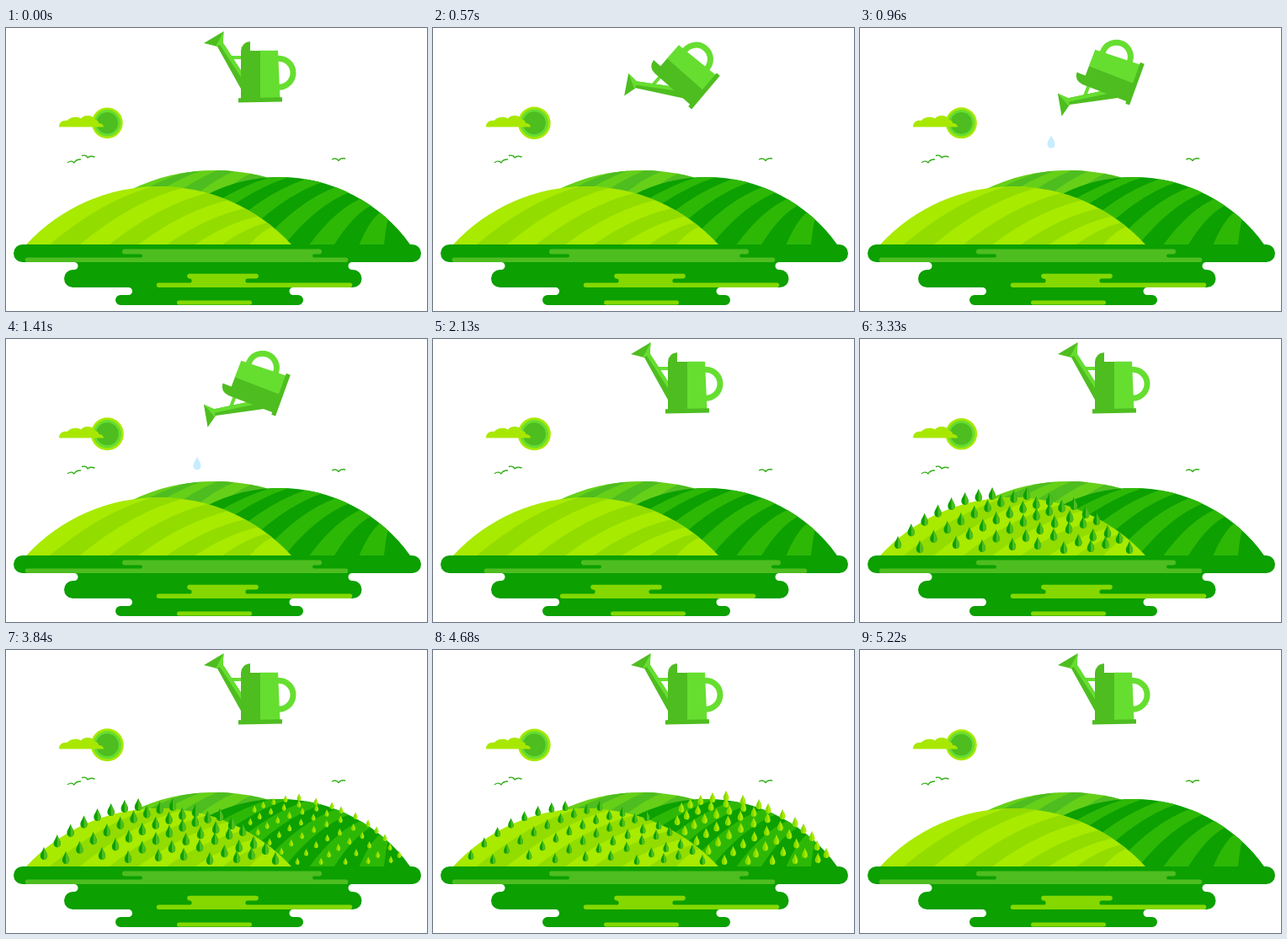
Recreate the animation shown at these times as an HTML page. Size 500 by 336 pixels, loop 5250 ms.

```html
<!DOCTYPE html>
<html lang="en">
<head>
<meta charset="utf-8">
<title>Watering the fields</title>
<style>
  html, body { margin: 0; width: 100%; height: 100%; overflow: hidden; background: #fff; }
  svg { display: block; width: 500px; height: 336px; }
</style>
</head>
<body>
<svg viewBox="0 0 500 336">
  <defs>
    <g id="leafDark">
      <path fill="#0ca000" d="M0-15C1.5-10.500 4.200-8 4.200-4.300A4.200 4.300 0 0 1-4.200-4.300C-4.200-8-1.500-10.500 0-15"/>
      <path fill="#4ebd20" d="M0-15C1.500-10.500 4.200-8 4.200-4.300A4.200 4.300 0 0 1 0 0"/>
    </g>
    <g id="leafLight">
      <path fill="#84d800" d="M0-15C1.500-10.500 4.200-8 4.200-4.300A4.200 4.300 0 0 1-4.200-4.300C-4.200-8-1.500-10.500 0-15"/>
      <path fill="#a8ea00" d="M0-15C1.500-10.500 4.200-8 4.200-4.300A4.200 4.300 0 0 1 0 0"/>
    </g>
  </defs>

  <g id="sun">
    <circle r="19.600" fill="#a8e800"/>
    <circle r="16.800" fill="#66de30"/>
    <circle r="13.600" fill="#4ebd20"/>
  </g>
  <path fill="#a8e800" d="M63 117.500C63 112 67 109 73 109.800C76 105.500 85 104.500 89 107.500C93 102.500 103 103 106 109C109 109.500 110 111 110 113C113 113 116 115 116 117.500Z"/>

  <g fill="none" stroke="#35b01a" stroke-width="1.400" stroke-linecap="round" stroke-linejoin="round">
    <path d="M73.500 159.500Q78 156.500 81 160Q83 156 88.500 156"/>
    <path d="M90.500 151.500Q95 150 97 154Q100 151 105 153"/>
    <path d="M387.500 156Q392 153.500 395 157.500Q397.500 154 402.500 155"/>
  </g>

  <path id="drop" fill="#c8ecff" d="M0-8C1.500-4 4.500-1 4.500 3A4.500 4.500 0 0 1-4.500 3C-4.500-1-1.500-4 0-8"/>
  <g id="hills"></g>

  <path fill="#0ca000" d="M19.500 257H482.500a10.500 10.500 0 0 1 0 21H411a4.500 4.500 0 0 0 0 9H412a10.500 10.500 0 0 1 0 21H341a4.500 4.500 0 0 0 0 9H347a6 6 0 0 1 0 12H136a6 6 0 0 1 0-12H145.500a4.500 4.500 0 0 0 0-9H79.500a10.500 10.500 0 0 1 0-21H81a4.500 4.500 0 0 0 0-9H19.500a10.500 10.500 0 0 1 0-21Z"/>
  <path class="strip" fill="#4ebd20" d="M141 262.500H372a3 3 0 0 1 0 6H366a2 2 0 0 0 0 4H403.500a2.800 2.800 0 0 1 0 5.600H25.500a2.800 2.800 0 0 1 0-5.600H160a2 2 0 0 0 0-4H141a3 3 0 0 1 0-6Z"/>
  <path class="strip" fill="#84d800" d="M218 291.800H297a2.800 2.800 0 0 1 0 5.600H287a2.600 2.600 0 0 0 0 5.200H408.500a2.700 2.700 0 0 1 0 5.400H181.500a2.700 2.700 0 0 1 0-5.400H218a2.600 2.600 0 0 0 0-5.200a2.800 2.800 0 0 1 0-5.600Z"/>
  <path class="strip" fill="#84d800" d="M205.500 323.400H289.500a2.500 2.500 0 0 1 0 5H205.500a2.500 2.500 0 0 1 0-5Z"/>

  <g id="can">
    <path fill="#66de30" d="M264 33H281V37H266Z"/>
    <circle cx="324" cy="53.300" r="17" fill="none" stroke="#66de30" stroke-width="7"/>
    <path fill="#4ebd20" d="M235 18L258.500 4L257.700 17.500L280 52V74L251 22Z"/>
    <path fill="#66de30" d="M258.500 4L257.700 17.500L280 52V60L254 20L249 22Z"/>
    <path fill="#4ebd20" d="M279 84V27.500Q279.500 17 290 16V27H302.500V84Z"/>
    <path fill="#66de30" d="M302 26.800H323L325.500 84H302Z"/>
    <path fill="#4ebd20" d="M276 83.300L328 82.300V87.500L276 88.500Z"/>
  </g>
</svg>
<script>
const LOOP = 5250;
const SVG = 'http://www.w3.org/2000/svg';
const $ = id => document.getElementById(id);
const hillLayer = $('hills'), strips = document.querySelectorAll('.strip');

function add(parent, tag, attrs) {
  const node = document.createElementNS(SVG, tag);
  for (const key in attrs) node.setAttribute(key, attrs[key]);
  return parent.appendChild(node);
}

// Circular hill cut at the ground line, with curved bands from bottom x to crest x.
function hill({ cx, cy, r, base, stripe, first, last, bottom, crest }) {
  const half = Math.sqrt(r * r - (cy - 257) ** 2);
  const shape = `M${cx - half} 257A${r} ${r} 0 0 1 ${cx + half} 257Z`;
  const id = 'clip' + cx;
  add(add(hillLayer, 'clipPath', { id }), 'path', { d: shape });
  add(hillLayer, 'path', { d: shape, fill: base });
  const edge = k => {
    const x0 = bottom(k), x1 = crest(k);
    const y1 = cy - Math.sqrt(r * r - (x1 - cx) ** 2) - 1;
    return { x0, x1, y1, qx: (x0 + x1) / 2, qy: y1 + (257 - y1) * 0.24 };
  };
  let d = '';
  for (let k = first; k <= last; k += 2) {
    const a = edge(k), b = edge(k + 1);
    d += `M${a.x0} 257Q${a.qx} ${a.qy} ${a.x1} ${a.y1}L${b.x1} ${b.y1}Q${b.qx} ${b.qy} ${b.x0} 257Z`;
  }
  add(hillLayer, 'path', { d, fill: stripe, 'clip-path': `url(#${id})` });
}

// Each row: start, control point, end, number of plants.
function plant(rows, leaf) {
  const plants = [];
  for (const [x0, y0, qx, qy, x1, y1, n] of rows) {
    for (let i = 0; i < n; i++) {
      const u = n > 1 ? i / (n - 1) : 0, v = 1 - u;
      plants.push({
        x: v * v * x0 + 2 * u * v * qx + u * u * x1,
        y: v * v * y0 + 2 * u * v * qy + u * u * y1,
        node: add(hillLayer, 'use', { href: '#' + leaf })
      });
    }
  }
  return plants;
}

hill({
  cx: 248, cy: 399, r: 230, base: '#66d018', stripe: '#4ebd20', first: 0, last: 8,
  bottom: k => 10 + 32 * k, crest: k => 178 + 19 * k
});
hill({
  cx: 325, cy: 367, r: 190, base: '#0ca000', stripe: '#2eb806', first: -1, last: 7,
  bottom: k => 213 + 29.5 * k, crest: k => 338 + 20.5 * k - 0.75 * k * k
});
const rightPlants = plant([
  [295, 193, 314, 182, 348, 179, 5],
  [290, 208, 315, 190, 368, 184, 6],
  [299, 220, 330, 196, 387, 189, 7],
  [313, 232, 345, 204, 398, 194, 7],
  [327, 243, 360, 212, 415, 201, 7],
  [346, 255, 375, 222, 430, 210, 7],
  [374, 255, 395, 233, 440, 218, 6],
  [403, 255, 420, 239, 450, 227, 4],
  [430, 254, 440, 248, 456, 238, 3],
  [457, 253, 462, 250, 467, 247, 2]
], 'leafLight');
hill({
  cx: 181.5, cy: 402, r: 214, base: '#a8ea00', stripe: '#92dc00', first: 0, last: 6,
  bottom: k => 52 + 36 * k - 0.3 * k * k, crest: k => 178 + 36 * k - 2.3 * k * k
});
const leftPlants = plant([
  [45, 249, 100, 194, 157, 191, 8],
  [71, 254, 137, 203, 198, 191, 9],
  [114, 249, 170, 209, 225, 198, 8],
  [145, 253, 204, 210, 254, 203, 8],
  [181, 251, 220, 224, 268, 213, 6],
  [211, 250, 250, 227, 281, 221, 5],
  [242, 255, 268, 240, 294, 236, 4],
  [274, 253, 292, 250, 308, 243, 3],
  [320, 255, 320, 255, 320, 255, 1]
], 'leafDark');

const ease = (t, from, to) => {
  const u = Math.min(1, Math.max(0, (t - from) / (to - from)));
  return (1 - Math.cos(Math.PI * u)) / 2;
};

function grow(plants, scale) {
  for (const { x, y, node } of plants) {
    node.setAttribute('transform', `translate(${x} ${y}) scale(${scale})`);
    node.setAttribute('visibility', scale > 0.01 ? 'visible' : 'hidden');
  }
}

function draw(t) {
  const pulse = 0.94 + 0.03 * (1 - Math.cos(12 * Math.PI * t / LOOP));
  $('sun').setAttribute('transform', `translate(120.300 112.800) scale(${pulse})`);

  const tilt = -69 * (ease(t, 0, 900) - ease(t, 1500, 2100));
  $('can').setAttribute('transform', `rotate(${tilt} 300.300 58)`);

  const start = t < 1130 ? 720 : 1130;
  const fall = (t - start) / 400;
  const falling = fall > 0 && fall < 1;
  $('drop').setAttribute('visibility', falling ? 'visible' : 'hidden');
  if (falling) {
    const size = Math.min(1, fall * 4);
    $('drop').setAttribute('transform', `translate(227 ${100 + 97 * fall * fall}) scale(${size})`);
  }

  const drift = ease(t, 1500, 2140) - ease(t, 2140, 2800);
  [38, -28, 8].forEach((dx, i) => strips[i].setAttribute('transform', `translate(${dx * drift} 0)`));

  const wither = 1 - ease(t, 4500, 5100);
  grow(leftPlants, ease(t, 2590, 3290) * wither);
  grow(rightPlants, ease(t, 3460, 4160) * wither);
}

function tick() {
  draw(performance.now() % LOOP);
  requestAnimationFrame(tick);
}
tick();
</script>
</body>
</html>
```
